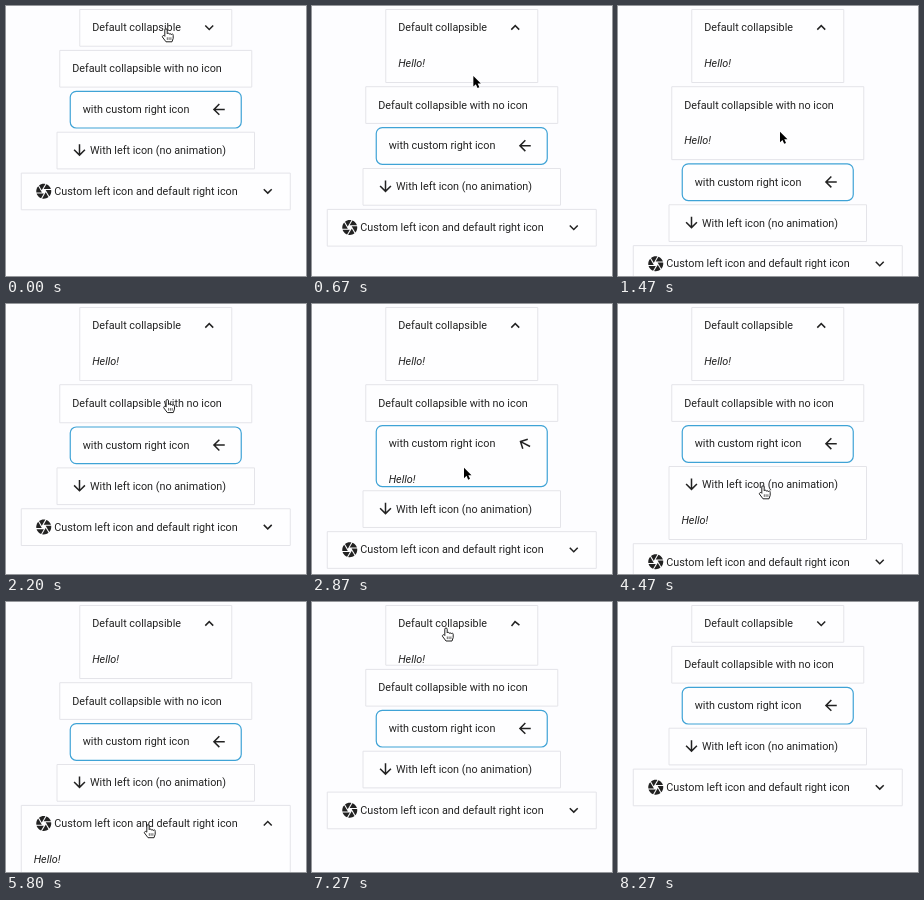
These frames come from a looping animation (300x270 px, 8340 ms). An HTML page with a canvas:

```html
<!DOCTYPE html>
<html lang="en">
<head>
<meta charset="utf-8">
<title>Collapsible panels</title>
<style>
  html, body { margin: 0; width: 100%; height: 100%; overflow: hidden; background: #fdfdff; }
  canvas { display: block; width: 300px; height: 270px; }
</style>
</head>
<body>
<canvas></canvas>
<script>
const LOOP = 8340, TOGGLE = 250;
const CENTER = 149.75, TOP = 3.5, HEADER = 36.7, CONTENT = 36.3, GAP = 4.2;
const PADDING = 12.4, ICON_INSET = 22.5, ICON_TEXT = 33;
const INK = '#222';

const canvas = document.querySelector('canvas');
const ctx = canvas.getContext('2d');
const scale = window.devicePixelRatio || 1;
canvas.width = 300 * scale;
canvas.height = 270 * scale;

const chevron = new Path2D('M7.41 8.58L12 13.17l4.59-4.59L18 10l-6 6-6-6z');
const arrow = new Path2D('M20 11v2H8l5.5 5.5-1.42 1.42L4.16 12l7.92-7.92L13.5 5.5 8 11h12z');
const blade = new Path2D('M9.4 10.5l4.77-8.26C13.47 2.09 12.75 2 12 2c-2.4 0-4.6.85-6.32 2.25l3.66 6.35z');
const pointer = new Path2D('M0 0V10.5L2.5 8.2 4.2 12 6 11.2 4.3 7.6H7.5Z');
const hand = new Path2D('M-1.2 7.5V1.2a1.2 1.2 0 0 1 2.4 0V5a1.1 1.1 0 0 1 2.1.4 1.1 1.1 0 0 1 2 .5 1 1 0 0 1 1.9.7V9.5L6 13H0L-3.6 8.2a1.2 1.2 0 0 1 1.8-1.3z');
const knuckles = new Path2D('M1.3 8.5v2.6M3.1 8.5v2.6M4.9 8.5v2.6');

const rightChevron = (x, y, turn) => drawIcon(chevron, x, y, turn * 180);
const rightArrow = (x, y, turn) => drawIcon(arrow, x, y, turn * 90);
const downArrow = (x, y) => drawIcon(arrow, x, y, -90);
function aperture(x, y) {
  for (let angle = 0; angle < 360; angle += 60) drawIcon(blade, x, y, angle);
}

// open / close: click times; aim: cursor x; peek: the cursor dips into the content while open
const panels = [
  { title: 'Default collapsible', width: 152, open: 20, close: 7220, aim: 160, right: rightChevron },
  { title: 'Default collapsible with no icon', width: 192, open: 1230, close: 2000, aim: 162, peek: true },
  { title: 'with custom right icon', width: 171, open: 2765, close: 3580, aim: 152, peek: true, right: rightArrow, rounded: true },
  { title: 'With left icon (no animation)', width: 197.5, open: 4200, close: 4710, aim: 145, left: downArrow },
  { title: 'Custom left icon and default right icon', width: 269, open: 5500, close: 6230, aim: 142, left: aperture, right: rightChevron }
];

const clamp = u => Math.min(1, Math.max(0, u));
const easeOut = u => 1 - (1 - u) ** 2;
const easeInOut = u => u < 0.5 ? 4 * u ** 3 : 1 - 4 * (1 - u) ** 3;
const smooth = u => u * u * (3 - 2 * u);

const cursorPath = planCursor();

function planCursor() {
  const path = [];
  const rest = (from, to, x, y) => path.push({ t: from, x, y }, { t: to, x, y });
  panels.forEach(({ open, close, aim, peek }, i) => {
    const y = TOP + i * (HEADER + GAP) + (i ? CONTENT : 0) + (peek ? 12 : 19.3);
    if (peek) {
      rest(open - 300, open, aim, y);
      rest(open + 130, open + 440, aim, y + 33);
      rest(close - 150, close + 150, aim, y);
    } else {
      rest(open - 200, i ? close + 150 : open + 230, aim, y);
    }
  });
  const { close } = panels[0];
  rest(close - 150, close + 80, 134, 26);
  path.push({ t: close + 380, x: 140, y: -20 });
  return path;
}

function cursorAt(t) {
  const next = cursorPath.findIndex(stop => stop.t > t);
  if (next < 1) return null;
  const a = cursorPath[next - 1], b = cursorPath[next];
  const u = smooth((t - a.t) / (b.t - a.t));
  return { x: a.x + (b.x - a.x) * u, y: a.y + (b.y - a.y) * u };
}

function openness(panel, t, ease) {
  return ease(clamp((t - panel.open) / TOGGLE)) - ease(clamp((t - panel.close) / TOGGLE));
}

function drawIcon(path, x, y, degrees) {
  ctx.save();
  ctx.translate(x, y);
  ctx.rotate(degrees * Math.PI / 180);
  ctx.scale(0.75, 0.75);
  ctx.translate(-12, -12);
  ctx.fill(path);
  ctx.restore();
}

function drawPanel(panel, y, height, turn) {
  const { title, width, left, right, rounded } = panel;
  const x = CENTER - width / 2;
  ctx.beginPath();
  ctx.roundRect(x, y, width, height, rounded ? 6 : 0);
  ctx.fillStyle = '#fefeff';
  ctx.fill();
  ctx.strokeStyle = rounded ? '#3fa3d6' : '#e4e4e9';
  ctx.lineWidth = rounded ? 1.2 : 1;
  ctx.stroke();

  ctx.fillStyle = INK;
  ctx.font = '10.8px Roboto, sans-serif';
  ctx.fillText(title, x + (left ? ICON_TEXT : PADDING), y + 21.8);
  if (left) left(x + ICON_INSET, y + 18.1);
  if (right) right(x + width - ICON_INSET, y + 18.1, turn);

  if (height > HEADER) {
    ctx.save();
    ctx.beginPath();
    ctx.rect(x, y + HEADER, width, height - HEADER);
    ctx.clip();
    ctx.font = 'italic 10.8px Roboto, sans-serif';
    ctx.fillText('Hello!', x + PADDING, y + 57.7);
    ctx.restore();
  }
}

function drawCursor({ x, y }, overHeader) {
  ctx.save();
  ctx.translate(x, y);
  ctx.lineJoin = 'round';
  ctx.lineWidth = 1;
  ctx.strokeStyle = overHeader ? INK : '#fff';
  ctx.fillStyle = overHeader ? '#fff' : '#000';
  if (overHeader) {
    ctx.fill(hand);
    ctx.stroke(hand);
    ctx.lineWidth = 0.7;
    ctx.stroke(knuckles);
  } else {
    ctx.stroke(pointer);
    ctx.fill(pointer);
  }
  ctx.restore();
}

function draw(t) {
  ctx.setTransform(scale, 0, 0, scale, 0, 0);
  ctx.fillStyle = '#fdfdff';
  ctx.fillRect(0, 0, 300, 270);

  const cursor = cursorAt(t);
  let y = TOP, overHeader = false;
  for (const panel of panels) {
    const height = HEADER + CONTENT * openness(panel, t, easeOut);
    drawPanel(panel, y, height, openness(panel, t, easeInOut));
    if (cursor && cursor.y >= y && cursor.y <= y + HEADER &&
        Math.abs(cursor.x - CENTER) <= panel.width / 2) overHeader = true;
    y += height + GAP;
  }
  if (cursor) drawCursor(cursor, overHeader);
}

const start = performance.now();
function frame() {
  draw((performance.now() - start) % LOOP);
  requestAnimationFrame(frame);
}
frame();
</script>
</body>
</html>
```
